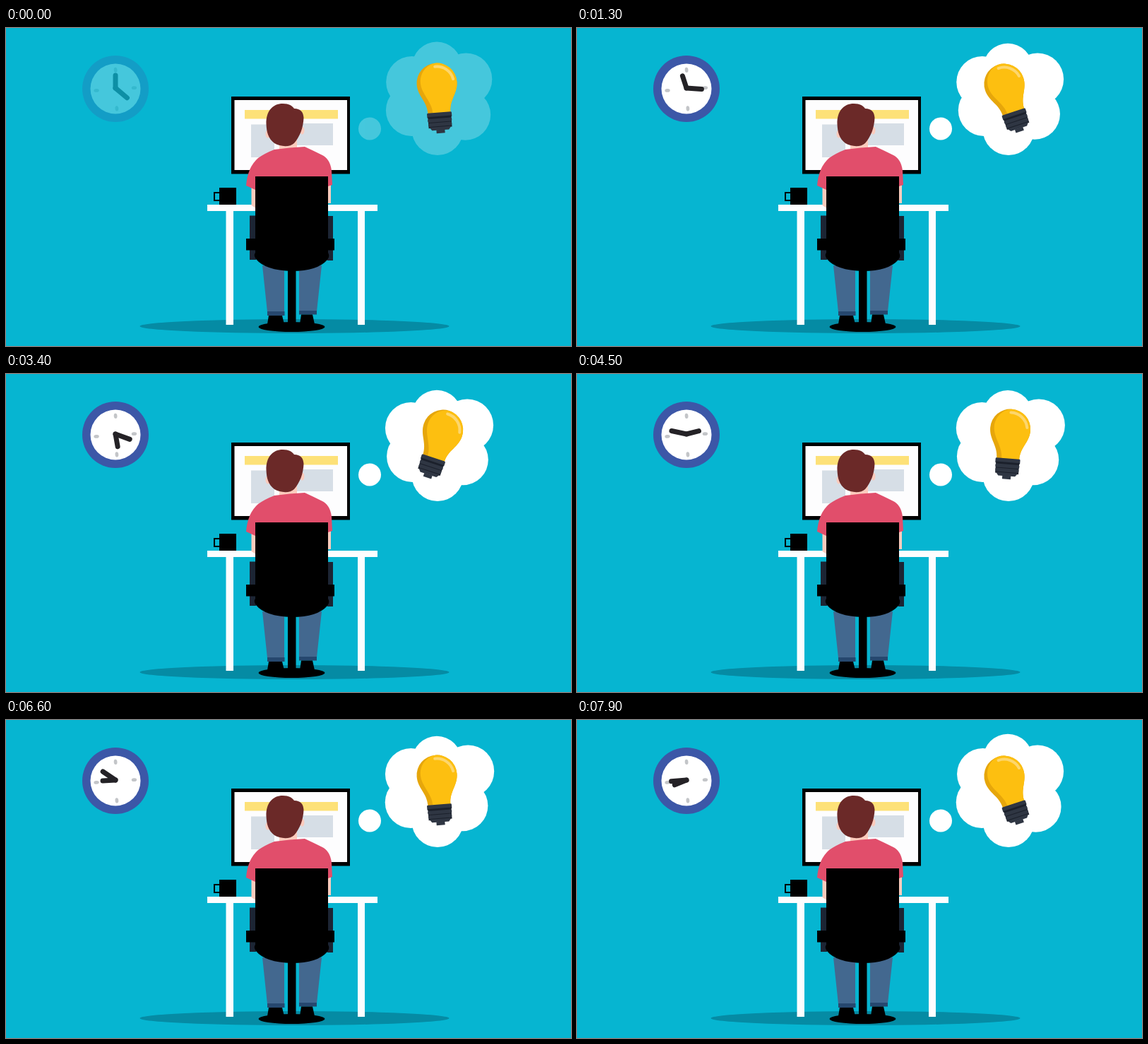
Animation of 800x450 px, one loop 8000 ms. Source, as an HTML page:

```html
<!DOCTYPE html>
<html lang="en">
<head>
<meta charset="utf-8">
<title>Thinking at the desk</title>
<style>
  html, body { margin: 0; height: 100%; overflow: hidden; background: #06b5d1; }
  svg { display: block; width: 800px; height: 450px; }
</style>
</head>
<body>
<svg viewBox="0 0 800 450">
  <ellipse cx="408.5" cy="422" rx="219" ry="10" fill="#058ba4"/>

  <g id="clock">
    <circle cx="155" cy="86" r="47" fill="#3c57a7"/>
    <circle cx="155" cy="86" r="35.5" fill="#fff"/>
    <g fill="#c3c5c8" transform="rotate(-4 155 86.5)">
      <ellipse cx="157" cy="59.5" rx="2.4" ry="3.7"/>
      <ellipse cx="181.5" cy="86.5" rx="3.7" ry="2.4"/>
      <ellipse cx="155" cy="114" rx="2.4" ry="3.7"/>
      <ellipse cx="128" cy="86.5" rx="3.7" ry="2.4"/>
    </g>
    <g stroke="#242226" stroke-width="7" stroke-linecap="round">
      <path id="hour" d="M0 0V-18"/>
      <path id="minute" d="M0 0V-21.5"/>
    </g>
  </g>

  <g id="cloud" fill="#fff">
    <circle cx="515" cy="142.5" r="16"/>
    <circle cx="611" cy="100" r="45"/>
    <circle id="top" cx="610" cy="56" r="35"/>
    <circle id="upRight" cx="652" cy="72.5" r="37"/>
    <circle id="lowRight" cx="648" cy="122" r="36"/>
    <circle cx="611" cy="143.5" r="36.5"/>
    <circle id="lowLeft" cx="574" cy="116.5" r="36.5"/>
    <circle id="upLeft" cx="574" cy="76.5" r="36.5"/>
  </g>

  <g id="bulb">
    <path fill="#e6a60b" d="M-28.5-22A28.5 28.5 0 0 1 28.5-22C28.5-5 16 2 16 20H-16C-16 2-28.5-5-28.5-22Z"/>
    <path fill="#fdbf10" d="M0-50.5A28.5 28.5 0 0 1 28.5-22C28.5-5 16 2 16 20H-9C-9 3-23-8-23-24C-23-38-13-49 0-50.5Z"/>
    <path fill="none" stroke="#fdd66c" stroke-width="4" stroke-linecap="round" d="M-1-45.5A24 24 0 0 1 23.5-26"/>
    <g fill="#2f3643">
      <rect x="-17.5" y="19.5" width="35" height="7.5" rx="1.5"/>
      <rect x="-16.5" y="25" width="33" height="16" fill="#1b202b"/>
      <rect x="-17" y="27.8" width="34" height="5" rx="1.5"/>
      <rect x="-16.5" y="33.8" width="33" height="5" rx="1.5"/>
      <path d="M-15.5 39.8H15.5L12 44.5H-12Z"/>
      <rect x="-6" y="44" width="12" height="5"/>
    </g>
  </g>

  <!-- monitor -->
  <path d="M319 97H487V206.500H319Z"/>
  <path fill="#fdfdfe" d="M323.500 102H483V201H323.500Z"/>
  <path fill="#fde178" d="M338 116H470V128.500H338Z"/>
  <path fill="#d6dee6" d="M347 136.500H380V183H347ZM392 135H463V166H392Z"/>

  <!-- desk and mug -->
  <path fill="#fdfdfe" d="M285 250H526V259H508V420H498V259H322V420H311.500V259H285Z"/>
  <path d="M302 226H326V250H302Z"/>
  <path fill="none" stroke="#000" stroke-width="2" d="M302 233H295V244H302"/>

  <!-- legs -->
  <path fill="#43688f" d="M363 336L394 340V402H370ZM415 340L447 336L440 401H415Z"/>
  <path fill="#26486f" d="M370 401H394.500V407H370ZM415 400H440V405.500H415Z"/>

  <!-- arms, neck, ears -->
  <g fill="#fbcbbd">
    <path d="M347.500 224H354V255L347.500 251ZM455 220H460V248H455Z"/>
    <path d="M387 155H412V174H387Z"/>
    <ellipse cx="371" cy="150" rx="3.500" ry="5.500"/>
    <ellipse cx="419.500" cy="145" rx="3" ry="5.500"/>
  </g>
  <path fill="#e14e6b" d="M380 172Q402 169 423 168Q436 174 447 179.500Q459 185 461 202L462 222L456 224V232H353V229L340 223Q342 197 357 184Q367 177 380 172Z"/>
  <path fill="#6b2928" d="M368.500 136C368 117 378 107 392 107C401 107 405 110 408 114C417 114 421 119 421.500 127C421 141 416 154 408 163C402 169 388 168 380 163C371 156 369 147 368.500 136Z"/>

  <!-- chair and shoes -->
  <path fill="#1c2534" d="M345 265.500H354V328H345ZM455 266H463V329H455Z"/>
  <path d="M340 298H354V314.500H340ZM455 298H465V314.500H455Z"/>
  <path d="M353 210H456V318Q459 323 455 328Q441 344 405 344Q367 343 354 327Q350 322 353 318Z"/>
  <path d="M399 340H410.500V422H399Z"/>
  <ellipse cx="404.500" cy="423" rx="47" ry="7"/>
  <path d="M372 407H391L394 419H370ZM418 405.500H434L437 419H416Z"/>
</svg>
<script>
  const el = id => document.getElementById(id);
  const LOOP = 8000, STEP = 100;
  // [ms, hour hand angle]
  const hourKeys = [[0, 0], [1300, 342], [2200, 584], [3400, 890], [4500, 1156], [6600, 1707], [8000, 2074]];

  function lerpKeys(keys, t) {
    const i = keys.findIndex(k => k[0] > t);
    const [t0, a] = keys[i - 1], [t1, b] = keys[i];
    return a + (b - a) * (t - t0) / (t1 - t0);
  }

  const wave = (t, period, shift = 0) => Math.cos(2 * Math.PI * (t / period - shift));
  const place = (id, x, y, angle = 0) =>
    el(id).setAttribute('transform', `translate(${x} ${y}) rotate(${angle})`);

  function draw(t) {
    const fade = Math.min(1, 0.25 + t / 500);
    el('clock').setAttribute('opacity', fade);
    el('cloud').setAttribute('opacity', fade);

    const hour = lerpKeys(hourKeys, t);
    place('hour', 155, 85, hour);
    place('minute', 155, 85, 130 + 2 * hour);

    place('top', 0, 0.3 - 1.8 * wave(t, 1000));
    place('upRight', 0.6 - 1.6 * wave(t, 1000, 0.1), 0);
    place('lowRight', 0.2 + 2 * wave(t, 1000, 0.03), 0.8 * wave(t, 1000));
    place('lowLeft', 0.4 + 2 * wave(t, 1000, 0.25), 0);
    place('upLeft', 0.7 * wave(t, 1000), 0);

    place('bulb', 611.8, 100, -19 * wave(t, 600, 0.211));
  }

  const start = performance.now();
  function tick() {
    const t = (performance.now() - start) % LOOP;
    draw(Math.floor(t / STEP) * STEP);
    requestAnimationFrame(tick);
  }
  tick();
</script>
</body>
</html>
```
